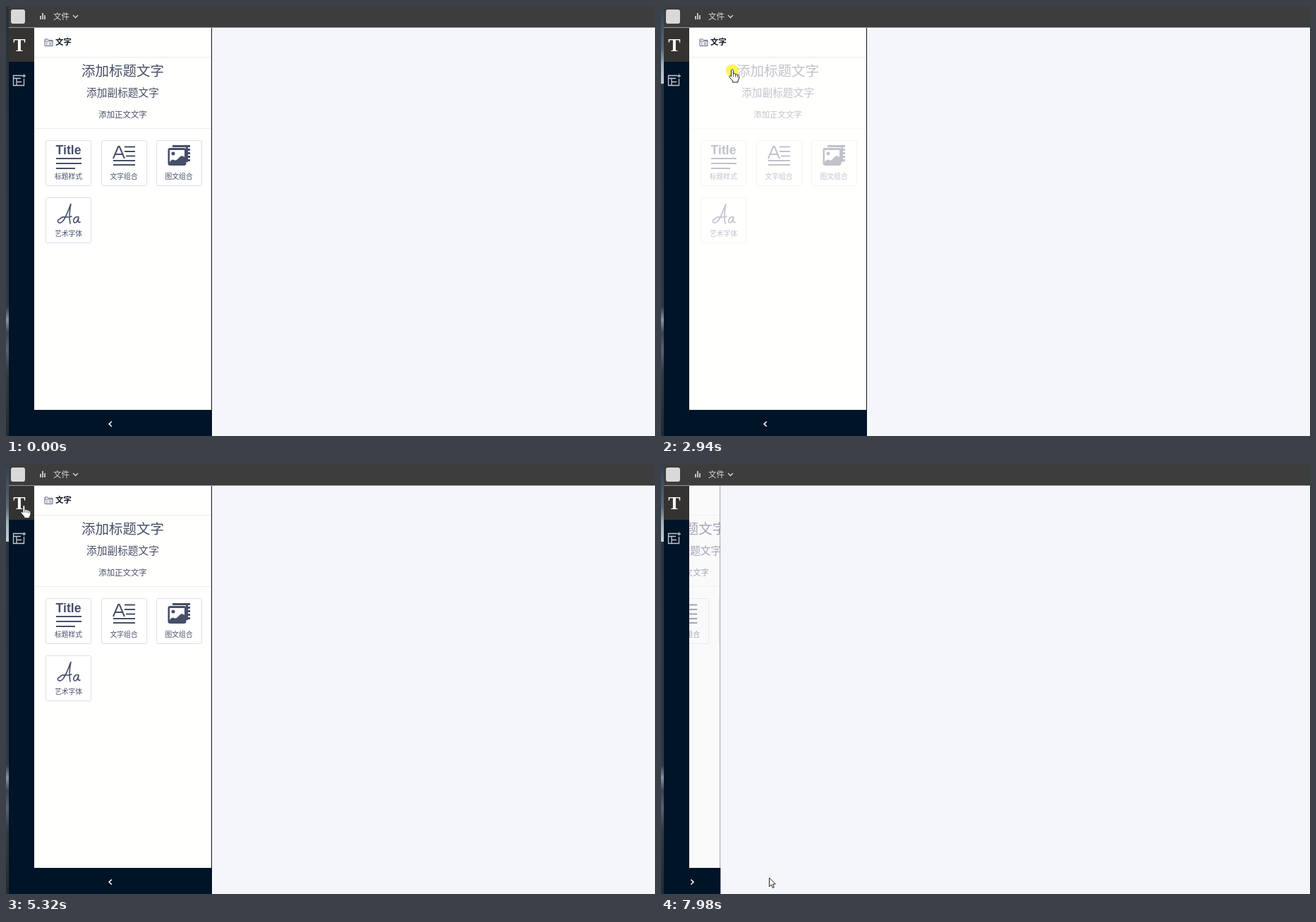
Recreate the animation shown at these times as an HTML page. Size 920 px wide and 609 px high, loop 8 s.

```html
<!DOCTYPE html>
<html lang="zh-CN">
<head>
<meta charset="utf-8">
<style>
html, body { margin: 0; width: 100%; height: 100%; overflow: hidden; background: #f5f6f9; }
svg { display: block; width: 920px; height: 609px; font-family: "Noto Sans CJK SC", "Noto Sans CJK", sans-serif; }
.mid { text-anchor: middle; }
.light { font-weight: 300; fill: #474f68; }
.bold { font-weight: 700; }
.line { fill: none; stroke: currentColor; }
.hot { --h: 0%; color: color-mix(in srgb, #4a97f3 var(--h), #474f68); }
.hot > .box { fill: #fff; stroke: color-mix(in srgb, #4a97f3 var(--h), #dcdfe7); }
.label { font-size: 9.8px; fill: #474f68; text-anchor: middle; }
.tile { fill: #fff; filter: drop-shadow(0 0 3px #bbb); }
</style>
</head>
<body>
<svg viewBox="0 0 920 609">
  <defs>
    <linearGradient id="edge" x2="0" y2="1">
      <stop stop-color="#28303a"/><stop offset=".35" stop-color="#2d3640"/>
      <stop offset=".7" stop-color="#303943"/><stop offset=".73" stop-color="#8793a3"/>
      <stop offset=".76" stop-color="#39434e"/><stop offset=".8" stop-color="#58636d"/>
      <stop offset=".85" stop-color="#323b44"/><stop offset="1" stop-color="#222a32"/>
    </linearGradient>
    <linearGradient id="glow" x2="0" y2="1">
      <stop stop-color="#2f3f52"/><stop offset=".55" stop-color="#54697c"/>
      <stop offset=".75" stop-color="#9fb3ba"/><stop offset="1" stop-color="#c3d0d0"/>
    </linearGradient>
    <clipPath id="clip"><rect id="clipBox" x="40" y="31" width="252" height="541"/></clipPath>
  </defs>

  <rect width="920" height="609" fill="#f5f6f9"/>

  <g id="panel" clip-path="url(#clip)">
    <rect x="40" y="31" width="252" height="541" fill="#fffffd"/>
    <g id="content">
      <g class="line" color="#5c6680">
        <path d="M55 56.500V47h4l1.500 1.500H66v8zM55 50h11"/>
        <path d="M57 52.500h2m1.500 0h4M57 54.500h2m1.500 0h4" stroke-width=".8"/>
      </g>
      <text x="70" y="55" font-size="11.4" class="bold" fill="#111827">文字</text>
      <path d="M40 72.500h252" stroke="#ebedf0"/>

      <g id="home">
        <path d="M40 173.500h252" stroke="#ebedf0"/>
        <g class="mid light">
          <text x="165.500" y="99" font-size="19.5">添加标题文字</text>
          <text x="165.500" y="128" font-size="14.7">添加副标题文字</text>
          <text x="165.500" y="158" font-size="11.4">添加正文文字</text>
        </g>
        <g class="hot" transform="translate(56 190)">
          <rect class="box" x=".5" y=".5" width="64" height="64" rx="2"/>
          <text x="32.500" y="20" class="mid bold" font-size="17.6" font-family="Liberation Sans, Arial, sans-serif" fill="currentColor">Title</text>
          <path class="line" stroke-width="2" d="M15 26h36M15 33h36M15 40h27"/>
          <text x="32.500" y="55" class="label">标题样式</text>
        </g>
        <g class="hot" transform="translate(135 190)">
          <rect class="box" x=".5" y=".5" width="64" height="64" rx="2"/>
          <path class="line" stroke-width="2" d="M17 26l7.200-17h1.600L33 26M19.500 20h11M33 9.500h15M33 16h15M35 22.500h13M17 29h31M17 35h31"/>
          <text x="32" y="55" class="label">文字组合</text>
        </g>
        <g class="hot" transform="translate(213 190)">
          <rect class="box" x=".5" y=".5" width="64" height="64" rx="2"/>
          <path class="line" stroke-width="3" d="M23 8.500H43.500V31"/>
          <path class="line" stroke-width="3" stroke-dasharray="3 2" d="M46.500 7V32"/>
          <rect x="16.500" y="11" width="26" height="25" rx="3" fill="currentColor"/>
          <path fill="#fff" d="M19 14h21v10q-4-4-8 1t-7 3-6 3z"/>
          <circle cx="24" cy="19" r="2.500" fill="currentColor"/>
          <text x="32" y="55" class="label">图文组合</text>
        </g>
        <g class="hot" transform="translate(56 271)">
          <rect class="box" x=".5" y=".5" width="64" height="64" rx="2"/>
          <path class="line" stroke-width="1.6" stroke-linecap="round" d="M20 31c-4 0-3 6 1 5C27 35 32 19 36 9c-2 10-3 19-1 28M20 31c4-6 9-1 17-4M47 28c-6-3-10 8-5 8 3 0 4-4 5-8-1 5-1 9 2 7"/>
          <text x="32.500" y="55" class="label">艺术字体</text>
        </g>
      </g>

      <g id="list">
        <g class="hot">
          <rect class="box" x="44.500" y="78.500" width="242" height="28" rx="2"/>
          <g class="line" stroke-width=".8"><circle cx="63" cy="92.500" r="4.500"/><path d="M64.200 90l-2.500 2.500 2.500 2.500"/></g>
          <text x="72" y="96.500" font-size="11.6" fill="currentColor">返回</text>
        </g>
        <g class="tile">
          <path d="M47 109h76v73H47zM128 109h76v73h-76zM209 109h76v73h-76zM47 187h116v73H47zM168 187h117v73H168z"/>
        </g>
        <g class="mid">
          <path d="M62.500 125h45v6h-45zM63 142.500h45L85 168z" fill="none" stroke="#9b9ba2" stroke-width=".7"/>
          <path d="M70.500 123h29v6.500h-29zM73.500 155h23L85 168.500z" fill="#cc3048"/>
          <circle cx="85" cy="141.500" r="3.500" fill="#cc3048"/>
          <text x="85" y="128.200" font-size="4.600" class="bold" fill="#fff">全部新品特惠</text>
          <text x="85" y="136" font-size="4.500" letter-spacing=".3" fill="#666">2017 NEW ARRIVAL</text>
          <text x="85" y="151" font-size="3.800" class="bold" fill="#222">新品超级特惠季</text>

          <path d="M132 146.500h18M181 146.500h19" stroke="#999"/>
          <text x="166" y="145" font-size="7.100" class="bold" fill="#555">新闻动态</text>
          <text x="166" y="152" font-size="7" font-family="Liberation Sans, Arial, sans-serif" fill="#999">NEWS</text>

          <path d="M212 138h69l-3 7.500 3 7.500h-69l4-7.500z" fill="#2096d6"/>
          <text x="246.500" y="148.500" font-size="7" class="bold" fill="#fff">请输入标题内容</text>

          <path d="M51 211h108M51 235h108" stroke="#438a4c"/>
          <path d="M51 213.500h108M51 233h108" stroke="#8fbc92"/>
          <text x="105" y="228" font-size="10.900" class="bold" fill="#111">请输入标题内容</text>

          <g fill="#cf4b78" stroke="#cf4b78">
            <path d="M174 223.500h13M266 223.500h12"/>
            <circle cx="174.500" cy="223.500" r="1.700"/><circle cx="278" cy="223.500" r="1.700"/>
          </g>
          <text x="226.500" y="228" font-size="10.900" class="bold" fill="#cf4b78">请输入标题内容</text>
        </g>
      </g>
    </g>
    <path id="border" d="M291.500 31v541" stroke="#111"/>
  </g>

  <rect id="bar" x="40" y="572" width="252" height="37" fill="#001428"/>
  <rect x="4" y="31" width="36" height="578" fill="#001428"/>
  <rect x="4" y="31" width="36" height="48" fill="#343331"/>
  <rect x="4" width="916" height="30.500" fill="#3c3d3c"/>
  <rect width="4" height="609" fill="url(#edge)"/>
  <rect id="tint" width="4" height="110" fill="url(#glow)"/>
  <rect x="7" y="5" width="20" height="20" rx="3" fill="#d9d9d9"/>
  <path d="M48 14h2v5h-2zM51 10h2v9h-2zM54 13h2v6h-2z" fill="#bfc2c2"/>
  <text x="67" y="18.800" font-size="11.600" fill="#d8d8d8">文件</text>
  <path d="M95 13l3.500 3.500L102 13" class="line" color="#d8d8d8" stroke-width="1.300"/>
  <text x="19" y="64" font-size="26" class="mid bold" font-family="Liberation Serif, Times, serif" fill="#fff">T</text>
  <path d="M23 98.500H10.500v14h15V103M10.500 102.500H21M15 112V102.500M15 107.500h7M25.500 96.500v5M23 99h5" class="line" color="#c5c9d0" stroke-width="1.300"/>
  <path id="chevron" d="M1.800-3.500L-1.800 0l3.600 3.500" class="line" color="#fff" stroke-width="1.600"/>

  <g id="cursor" stroke="#222" fill="#fff">
    <circle id="press" cy="1.500" r="9" fill="#fff13a" stroke="none" opacity=".85"/>
    <path id="arrow" d="M.5 0v12.500l2.900-2.700 2 4.600 2-.9-2-4.500h3.900z"/>
    <g id="hand">
      <path d="M-1.500 1.500c0-2 3-2 3 0V6c1-1 3-.5 3 .8 1-.8 2.700-.3 2.700 1 1-.6 2.400 0 2.400 1.400V13l-1.500 3v2H.5v-2L-3.800 11c-1.200-2 .8-3 2.300-1z"/>
      <path d="M1.500 6v4M4.500 7v3.500M7.200 8v3" stroke-width=".8"/>
    </g>
  </g>
</svg>
<script>
const LOOP = 8000, SLIDE = 400, WIDTH = 252;
const $ = id => document.getElementById(id);
const clamp = v => Math.max(0, Math.min(1, v));
const inside = ([x, y], [l, t, w, h]) => x >= l && x < l + w && y >= t && y < t + h;
const latest = (events, t) => events.filter(e => e[0] <= t).pop();

// Pointer stops: time, x, y
const path = [
  [440, 655, 528], [1000, 106, 222], [1420, 106, 222], [1900, 152, 160], [2100, 152, 160],
  [2230, 132, 194], [2310, 132, 194], [2500, 150, 235], [2780, 101, 90], [3000, 101, 90],
  [3420, 165, 217], [3980, 165, 217], [4200, 185, 190], [4590, 101, 90], [4880, 101, 90],
  [5450, 14, 54], [6860, 14, 54], [7710, 152, 581], [7780, 152, 581], [7930, 153, 586]
];
const clicks = [1290, 2800, 3850, 4690, 5500, 6380, 7750];
const pages = [[-500, 'home'], [1400, 'list'], [2900, 'home'], [3930, 'list'], [4855, 'home']];
const slides = [[-500, 0], [5570, 1], [6390, 0], [7772, 1]];

const cards = [[56, 190, 65, 65], [135, 190, 65, 65], [213, 190, 65, 65], [56, 271, 65, 65]];
const back = [44, 78, 243, 29];
const rows = [[44, 76, 243, 94]];
const tiles = [back, [47, 109, 238, 151]];
const hotspots = [...cards.map(box => ['home', box]), ['list', back]];
const hotNodes = document.querySelectorAll('.hot');

function pointer(t) {
  const i = path.findIndex(p => p[0] > t);
  if (i < 0) return path.at(-1).slice(1);
  if (i === 0) return path[0].slice(1);
  const [t0, x0, y0] = path[i - 1], [t1, x1, y1] = path[i];
  const u = (t - t0) / (t1 - t0), k = u * u * (3 - 2 * u);
  return [x0 + (x1 - x0) * k, y0 + (y1 - y0) * k];
}

// cubic-bezier(.25, .1, .25, 1)
function ease(x) {
  let lo = 0, hi = 1;
  const curve = (u, a, b) => 3 * a * u * (1 - u) ** 2 + 3 * b * u * u * (1 - u) + u ** 3;
  for (let i = 0; i < 20; i++) {
    const u = (lo + hi) / 2;
    if (curve(u, .25, .25) < x) lo = u; else hi = u;
  }
  return curve(lo, .1, 1);
}

// Share of the last 240 ms the pointer spent on a hotspot
function hover([page, box], t) {
  let hits = 0;
  for (let age = 0; age < 240; age += 20)
    if (latest(pages, t - age)?.[1] === page && inside(pointer(t - age), box)) hits++;
  return hits / 12;
}

function draw(t) {
  const [slideAt, closing] = latest(slides, t);
  const raw = clamp((t - slideAt) / SLIDE), eased = ease(raw);
  const away = closing ? raw : 1 - raw;
  const width = WIDTH * (closing ? 1 - eased : eased);
  $('panel').style.opacity = 1 - away;
  $('clipBox').setAttribute('width', width);
  $('content').setAttribute('transform', `translate(${-WIDTH * away} 0)`);
  $('border').setAttribute('transform', `translate(${width - WIDTH} 0)`);
  $('bar').setAttribute('width', width);
  $('chevron').setAttribute('transform', `translate(${22 + width / 2} 592) scale(${closing ? -1 : 1} 1)`);

  const [pageAt, page] = latest(pages, t);
  for (const id of ['home', 'list'])
    $(id).style.opacity = id === page ? clamp((t - pageAt) / 120) : 0;
  hotspots.forEach((spot, i) => hotNodes[i].style.setProperty('--h', hover(spot, t) * 100 + '%'));
  $('tint').style.opacity = t > 1400 ? 1 : 0;

  const pos = pointer(t);
  const targets = [[4, 31, 36, 90]];
  if (width > 1) targets.push([40, 572, width, 37]);
  if (width > 200) targets.push(...(page === 'home' ? [...cards, ...rows] : tiles));
  const over = targets.some(box => inside(pos, box));
  $('cursor').setAttribute('transform', `translate(${pos})`);
  $('cursor').style.display = t < 440 ? 'none' : '';
  $('hand').style.display = over ? '' : 'none';
  $('arrow').style.display = over ? 'none' : '';
  $('press').style.display = clicks.some(c => t >= c && t < c + 165) ? '' : 'none';
}

const start = performance.now();
function tick() {
  draw((performance.now() - start) % LOOP);
  requestAnimationFrame(tick);
}
tick();
</script>
</body>
</html>
```
